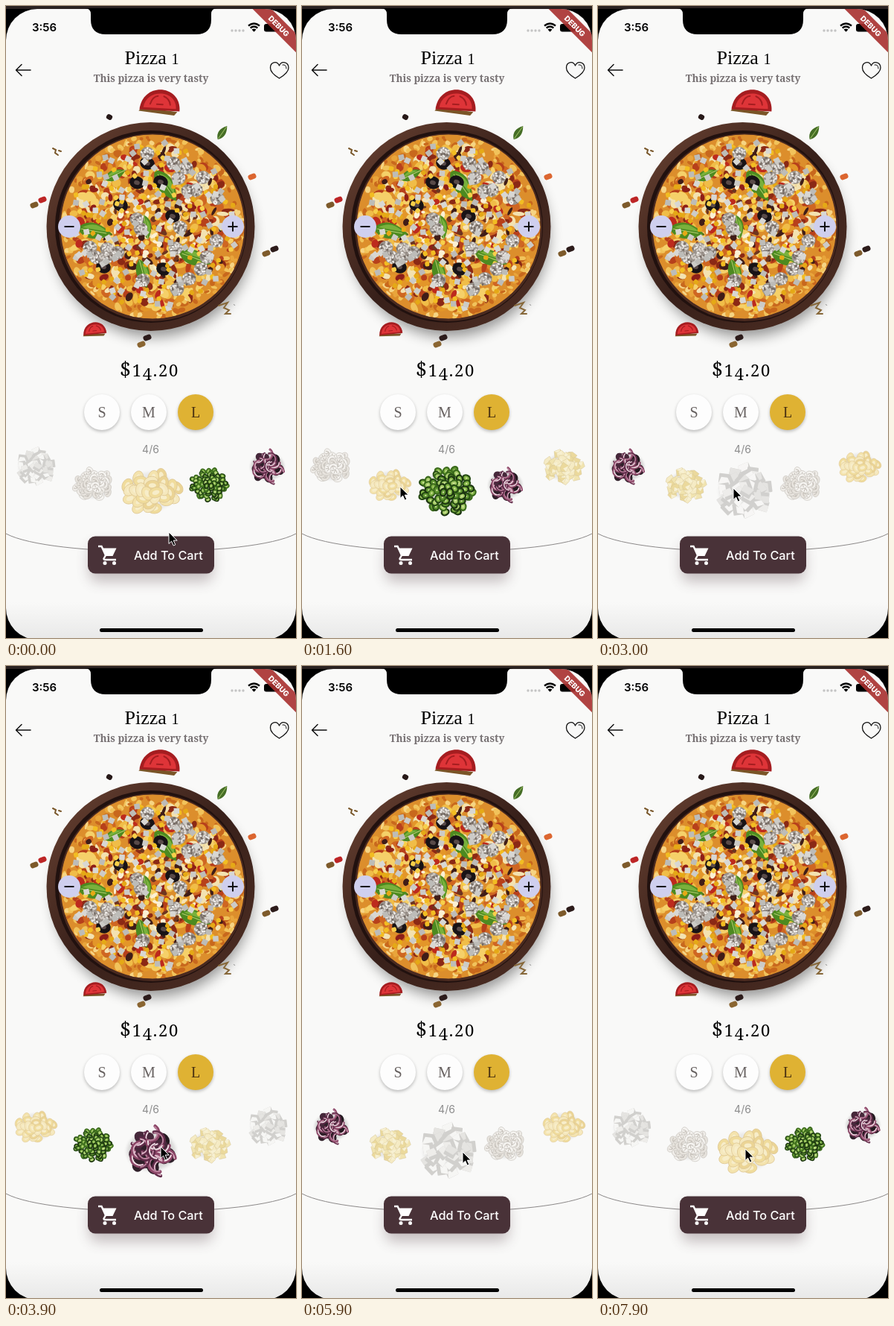
Animation, 390 px wide and 848 px high, one loop 8 s. Source, as an HTML page:

```html
<!DOCTYPE html>
<html lang="en">
<head>
<meta charset="utf-8">
<title>Pizza order</title>
<style>
html, body { margin: 0; width: 100%; height: 100%; overflow: hidden; background: #000; }
svg { display: block; width: 100vw; height: 100vh; }
.serif { font-family: "Noto Serif", serif; }
.roman { font-family: "Liberation Serif", serif; }
.sans { font-family: Inter, sans-serif; }
.mid { text-anchor: middle; }
</style>
</head>
<body>
<svg viewBox="0 0 390 848">
  <defs>
    <clipPath id="screen"><rect y="4" width="390" height="846" rx="42"/></clipPath>
    <clipPath id="disc"><circle cx="197" cy="296" r="123.5"/></clipPath>
    <linearGradient id="wood" x1="0" y1="0" x2="1" y2="1">
      <stop offset="0" stop-color="#6b4333"/><stop offset=".5" stop-color="#38201a"/><stop offset="1" stop-color="#4f2f24"/>
    </linearGradient>
    <linearGradient id="floor" x1="0" y1="0" x2="0" y2="1">
      <stop offset="0" stop-color="#ddd" stop-opacity="0"/><stop offset="1" stop-color="#ddd" stop-opacity=".6"/>
    </linearGradient>
    <filter id="blur" x="-50%" y="-50%" width="200%" height="200%"><feGaussianBlur stdDeviation="9"/></filter>
    <filter id="soft" x="-50%" y="-50%" width="200%" height="200%"><feGaussianBlur stdDeviation="2"/></filter>
  </defs>
  <rect width="390" height="848"/>
  <rect width="390" height="4" fill="#2b2321"/>
  <g clip-path="url(#screen)">
    <rect width="390" height="850" fill="#f9f9f8"/>
    <rect y="800" width="390" height="50" fill="url(#floor)"/>

    <text class="sans" x="35" y="34" font-size="15" font-weight="600">3:56</text>
    <g fill="#c4c4c4"><circle cx="304" cy="33" r="1.7"/><circle cx="309" cy="33" r="1.7"/><circle cx="314" cy="33" r="1.7"/><circle cx="319" cy="33" r="1.7"/></g>
    <g fill="none" stroke="#000" stroke-width="2.3"><path d="M326 26.5q7.5-6 15 0M328.700 29.500q4.800-4 9.600 0"/></g>
    <path d="M330.500 31.500q3-2 6 0l-3 3.200z"/>
    <rect x="347" y="24" width="21" height="10.500" rx="3"/><rect x="369" y="27" width="1.500" height="4" rx=".7"/>
    <g transform="translate(366.500 27.500) rotate(45)">
      <rect x="-60" y="-10" width="120" height="18" fill="#a9302f" opacity=".9"/>
      <text class="sans mid" y="3" font-size="10" font-weight="800" fill="#fff">DEBUG</text>
    </g>

    <g fill="none" stroke="#111" stroke-width="1.500" stroke-linecap="round" stroke-linejoin="round">
      <path d="M33 86H14m7-7.500-7.500 7.500 7.500 7.500"/>
      <path d="M367.500 97c-5-3-12-8-12-14 0-8 9-10 12-3 3-7 12.500-5 12.500 3 0 6-7.500 11-12.500 14z" stroke-width="1.300"/>
      <path d="M372 79q5-1 5 5" stroke-width="1"/>
    </g>
    <text class="roman mid" x="196" y="78" font-size="26">Pizza <tspan font-size="20">1</tspan></text>
    <text class="serif mid" x="195" y="102" font-size="13.500" font-weight="700" fill="#777173">This pizza is very tasty</text>

    <ellipse cx="198" cy="308" rx="134" ry="136" opacity=".4" filter="url(#blur)"/>
    <circle cx="194.500" cy="296" r="140" fill="url(#wood)"/>
    <circle cx="195" cy="296" r="129" fill="#21110f"/>
    <circle cx="197" cy="297" r="126" fill="#4a2a20"/>
    <g id="pizza" clip-path="url(#disc)"></g>
    <g id="crumbs"></g>
    <g fill="#cfcfee"><circle cx="85" cy="296" r="15"/><circle cx="305" cy="296" r="15"/></g>
    <path d="M78.500 296h13M298.500 296h13M305 289.500v13" stroke="#111" stroke-width="2"/>

    <text class="serif" x="153" y="497" font-size="22" letter-spacing="1.700"><tspan font-size="27">$</tspan>1<tspan dy="5">4</tspan><tspan dy="-5">.20</tspan></text>
    <g id="sizes"></g>
    <text class="sans mid" x="194.500" y="600" font-size="14" fill="#8c8c8c">4/6</text>

    <path d="M0 708C60 740 330 740 390 708" fill="none" stroke="#8b8888" stroke-width="1"/>
    <g id="ring"></g>
    <rect x="112" y="722" width="166" height="50" rx="12" fill="#49333a" opacity=".3" filter="url(#blur)"/>
    <rect x="110" y="711.500" width="170" height="50" rx="10" fill="#493238"/>
    <g fill="none" stroke="#fff" stroke-width="2.400"><path d="M124 725h4.500l5.500 12-2.500 4.500q0 1.500 2 1.500h14.500"/></g>
    <path d="M129.500 727.500h19l-5 10.500h-10z" fill="#fff"/>
    <g fill="#fff"><circle cx="133" cy="747.500" r="2.500"/><circle cx="145.500" cy="747.500" r="2.500"/></g>
    <text class="sans" x="172" y="743" font-size="16.300" font-weight="500" fill="#fff">Add To Cart</text>
    <rect x="126" y="835" width="139" height="5" rx="2.500"/>
  </g>
  <path d="M106 3q8 0 8 8v7q0 20 20 20h122q20 0 20-20v-7q0-8 8-8z"/>
  <path id="cursor" d="M0 0V15.500l3.600-3.400 2.600 5.900 2.600-1.200-2.600-5.700h5z" stroke="#fff" stroke-width="1"/>
</svg>
<script>
const $ = id => document.getElementById(id);
let seed = 7;
const rand = (a = 1, b = 0) => {
  seed = (seed * 16807) % 2147483647;
  return b + (a - b) * seed / 2147483647;
};
const pick = list => list[Math.floor(rand(list.length))];

// Shape helpers return markup
const at = (x, y, turn, body) =>
  `<g transform="translate(${x.toFixed(1)} ${y.toFixed(1)}) rotate(${turn.toFixed(0)})">${body}</g>`;
const oval = (rx, ry, fill, more = '') => `<ellipse rx="${rx}" ry="${ry}" fill="${fill}" ${more}/>`;
const box = (w, h, fill, r = 1) =>
  `<rect x="${-w / 2}" y="${-h / 2}" width="${w}" height="${h}" rx="${r}" fill="${fill}"/>`;
const line = (d, stroke, width) =>
  `<path d="${d}" fill="none" stroke="${stroke}" stroke-width="${width}" stroke-linecap="round"/>`;

// Evenly scattered points in an ellipse, outermost first
function scatter(n, rx, ry, draw, cx = 0, cy = 0, inner = 0) {
  let out = '';
  for (let i = n - 1; i >= 0; i--) {
    const r = Math.sqrt(inner + (1 - inner) * (i + rand()) / n), a = i * 2.4 + rand(.5);
    out += at(cx + rx * r * Math.cos(a), cy + ry * r * Math.sin(a), rand(360), draw(i));
  }
  return out;
}

function pizza() {
  const blobs = (n, r, colors, size, inner = 0) => scatter(n, r, r, () =>
    oval(rand(size, size / 3).toFixed(1), rand(size * .7, size / 4).toFixed(1), pick(colors)), 197, 296, inner);
  const leaf = (x, y, turn, s) => at(x, y, turn,
    `<path transform="scale(${s})" d="M-20 0Q-5-19 22 0Q-4 18-20 0z" fill="#4d8a20"/>` +
    `<path transform="scale(${s})" d="M-14-2Q0-13 15-2z" fill="#79b13c"/>` + line('M-17 0H17', '#b5cf72', 1));
  const olive = (x, y) => at(x, y, 20, oval(10, 8.5, '#181316') + oval(4, 3, '#584a48'));
  const ball = (x, y) => at(x, y, 0, oval(9.5, 9, '#9b938c') + scatter(20, 8.5, 8, () =>
    oval(2, 1.2, pick(['#dedad5', '#d0cac4', '#746a63', '#efedea']))));
  const balls = [[190,198],[225,211],[242,217],[265,230],[232,231],[255,247],[284,258],[245,248],[181,299],[176,286],
    [234,297],[283,315],[113,324],[121,337],[136,326],[150,331],[134,338],[228,325],[270,337],[246,366],[230,380],[184,368],[262,353]];
  return '<circle cx="197" cy="296" r="124" fill="#dc8e2c"/>' +
    blobs(170, 122, ['#f1c35b', '#e9a53b', '#c8681d', '#f6d483'], 6, .78) +
    blobs(520, 109, ['#f0bd48', '#b7401b', '#f3e2b0', '#8b2915', '#e39629', '#f5d069', '#cf6622'], 9) +
    blobs(60, 105, ['#8e1f18', '#bd2a1d', '#401d18'], 8) +
    blobs(90, 60, ['#fbf0d4', '#f6e3b5', '#6e3520'], 6) +
    leaf(214, 240, 55, 1.2) + leaf(118, 302, 10, 1.15) + leaf(253, 338, 20, 1.1) +
    leaf(184, 358, 75, .95) + leaf(146, 227, -25, .75) + leaf(188, 296, 80, .8) +
    [[176,237],[208,236],[131,350],[212,353],[224,282],[154,267],[190,211]].map(p => olive(...p)).join('') +
    scatter(150, 112, 112, () => box(6.5, 6, pick(['#f2bd22', '#e5a916', '#f7cf4a']), 2.2), 197, 296) +
    balls.map(p => ball(...p)).join('') +
    scatter(105, 114, 114, () => box(7.5, 7.5, pick(['#cccbc7', '#bdbcb8', '#d8d7d3']), .5), 197, 296);
}

function crumbs() {
  const pill = (x, y, fill, turn = -20) => at(x, y, turn, box(11, 7, fill, 3));
  const slice = (x, y, turn, s) => at(x, y, turn, `<g transform="scale(${s})">` +
    '<path d="M-28 13L-24 8L24 12L20 17z" fill="#7a5527"/><path d="M-27 11C-24-27 28-25 27 11z" fill="#a51d20"/>' +
    '<path d="M-22 8C-19-18 22-18 22 8z" fill="#de3438"/>' + line('M-13 3q3-10 10-11M5-8q8 3 9 11M-4 3h8', '#a51d20', 2) + '</g>');
  return slice(207, 129, 3, 1) + slice(119, 434, -6, .58) +
    at(139, 149, 30, box(8, 7, '#271918', 3)) +
    at(291, 170, -55, '<path d="M-11 0Q-2-10 11 0Q-2 9-11 0z" fill="#456d25"/>' + line('M-9 0H9', '#93b85e', 1)) +
    line('M63 191l4 2-1 4 4 3m1-6 3 1', '#79572a', 2) +
    line('M286 402l12-4-5 7 7 3-5 5h7', '#87683a', 2) + at(307, 401, 40, box(3, 1, '#999')) +
    pill(49, 260, '#bd2526') + pill(38, 267, '#7d5a2b') + pill(331, 229, '#dc6630') +
    pill(361, 326, '#2d1c1b') + pill(350, 332, '#7d5a2b') + pill(190, 445, '#2d1c1b') + pill(182, 454, '#8a6531');
}

const sizes = ['S', 'M', 'L'].map((name, i) => {
  const x = 129 + 63 * i, on = name === 'L';
  return `<circle cx="${x}" cy="547" r="24" opacity=".25" filter="url(#soft)"/>` +
    `<circle cx="${x}" cy="545" r="24" fill="${on ? '#dfb233' : '#fdfdfd'}"/>` +
    `<text class="roman mid" x="${x}" y="551.5" font-size="20" fill="${on ? '#4a3212' : '#66605f'}">${name}</text>`;
}).join('');

// Toppings in carousel order; chosen ones are faded
const toppings = [
  [.5, () => scatter(30, 34, 31, () => box(15, 14, '#aaa8a4', 1) +
    `<path d="M-7.500-7h15l-3 9h-12z" fill="${pick(['#f5f4f1', '#e4e2de', '#d2d0cb'])}"/>`)],
  [.5, () => scatter(32, 34, 29, () => oval(9, 6.5, pick(['#e6e1d9', '#d6cfc4', '#f2efe9']), 'stroke="#9b9388"') +
    line('M-5 2q5-8 10 0M0-2v6', '#8e8376', 1.4))],
  [.52, () => scatter(28, 36, 25, () => oval(9.5, 7, pick(['#e8c24a', '#f0d06a', '#dfb43c', '#f3d988']), 'stroke="#c69a37" stroke-width=".8"') +
    oval(5, 3, '#f6e3a0'))],
  [1, () => scatter(60, 35, 30, () => oval(6.2, 5, pick(['#264b14', '#1c3510', '#3b6a1c'])) +
    oval(3.8, 2.9, pick(['#84b647', '#a6cc68', '#5e9530'])) + oval(1.3, 1, '#d8e6a4'))],
  [1, () => scatter(15, 27, 24, () => oval(10, 8, pick(['#30202a', '#46283a', '#241a20']))) +
    scatter(17, 25, 24, () => line('M-11 3C-9-9 8-11 11 3', pick(['#8b4566', '#5e2a47']), 4.5) +
      line('M-10 3C-8-7 7-9 10 3', pick(['#dbb2c4', '#efdde4', '#b9809b']), 2))],
  [.55, () => scatter(30, 34, 28, () =>
    `<path d="M-9 5L-4-7L8-5L9 5L2 8z" fill="${pick(['#ecd476', '#e0c052', '#f3e09a'])}" stroke="#b99b48" stroke-width=".7"/>` +
    '<path d="M-4-7L8-5L3 2z" fill="#f6e9b4"/>')]
];

$('pizza').innerHTML = pizza();
$('crumbs').innerHTML = crumbs();
$('sizes').innerHTML = sizes;
$('ring').innerHTML = toppings.map(([fade, draw]) =>
  `<g opacity="${fade}">${oval(33, 26, '#000', 'opacity=".12" filter="url(#soft)"')}${draw()}</g>`).join('');
const items = [...$('ring').children];

// time, carousel page, pointer x, pointer y
const keys = [
  [0, 2, 219, 706], [700, 2, 242, 655], [900, 2, 238, 650], [1350, 3, 140, 645], [1600, 3, 132, 645],
  [2050, 2, 215, 646], [2150, 2, 176, 647], [2500, 1, 232, 647], [2600, 1, 174, 647], [2950, 0, 186, 647], [3000, 0, 182, 647],
  [3400, -1, 238, 646], [3500, -1, 178, 646], [3850, -2, 236, 645], [3950, -2, 180, 645], [4300, -3, 238, 645],
  [4400, -3, 182, 645], [4780, -4, 239, 645], [4850, -4, 239, 645], [4950, -4, 180, 648], [5300, -5, 235, 650],
  [5420, -5, 174, 651], [5820, -6, 217, 652], [5900, -6, 216, 652], [6000, -6, 172, 652], [6380, -7, 235, 652],
  [6450, -7, 170, 652], [6850, -8, 196, 652], [6930, -8, 172, 650], [7300, -9, 236, 649], [7400, -9, 176, 648],
  [7750, -10, 192, 648], [7900, -10.06, 198, 648], [8000, -10.3, 215, 648]
];

function pose(t) {
  const n = keys.findIndex(k => k[0] > t), a = keys[n - 1], b = keys[n];
  const u = (t - a[0]) / (b[0] - a[0]), e = u * u * (3 - 2 * u);
  return a.map((v, i) => v + (b[i] - v) * e);
}

function render(ms) {
  const [, page, px, py] = pose(Math.floor(ms % 8000 / 100) * 100);
  items.forEach((item, i) => {
    const d = (((i - page + 3) % 6) + 6) % 6 - 3;
    const scale = Math.max(.69, 1 - .31 * Math.abs(d));
    item.setAttribute('transform', `translate(${195.5 + 78 * d} ${651 - 8.2 * d * d}) scale(${scale})`);
  });
  $('cursor').setAttribute('transform', `translate(${px} ${py})`);
}

const start = performance.now();
function tick() {
  render(performance.now() - start);
  requestAnimationFrame(tick);
}
tick();
</script>
</body>
</html>
```
